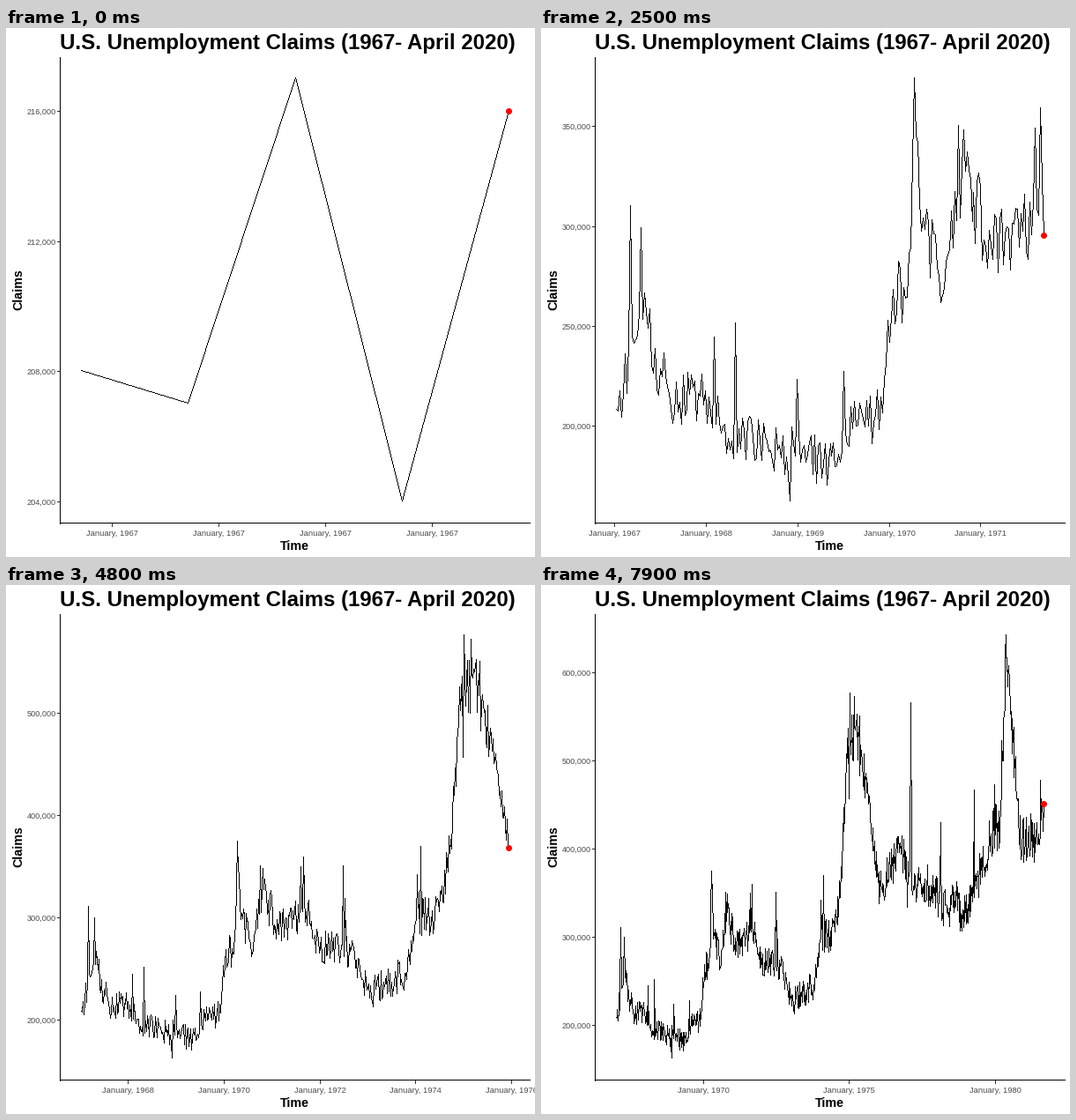
Recreate the animation shown at these times as a matplotlib script. Size 600x600 px, loop 8 s.

```python
import math

import matplotlib.pyplot as plt
import numpy as np
from matplotlib.animation import FuncAnimation

plt.rcParams["font.family"] = "Liberation Sans"

FRAMES, INTERVAL = 80, 100
WEEKS_PER_FRAME = 9.615
PX = 0.72  # points per pixel at 100 dpi
LEFT, RIGHT, TOP, BOTTOM = 85, 570, 57, 537  # data area
X0, X1, Y0, Y1 = 61, 594, 33, 561  # panel
MARGIN = 0.05
NOISE = 0.07
DAY0 = np.datetime64("1967-01-07")

# (week, thousands of claims): the slow trend, then single-week extremes
TREND = [
    (0, 208), (1, 207), (2, 217), (3, 204), (4, 216), (7, 240), (13, 256),
    (30, 216), (53, 214), (60, 196), (121, 182), (135, 198), (152, 206),
    (158, 268), (166, 264), (171, 345), (176, 298), (184, 275), (197, 330),
    (214, 290), (232, 297), (242, 318), (260, 270), (284, 272), (304, 248),
    (316, 220), (321, 229), (354, 245), (364, 295), (390, 305), (402, 362),
    (414, 520), (428, 542), (439, 500), (450, 450), (466, 368), (475, 350),
    (508, 405), (531, 357), (562, 358), (592, 325), (604, 350), (618, 320),
    (645, 362), (677, 428), (686, 425), (695, 620), (703, 575), (722, 410),
    (748, 412), (764, 451),
]
EXTREMES = [
    (8, 310), (14, 299), (56, 244), (68, 251), (99, 162), (103, 223),
    (130, 227), (170, 374), (195, 350), (239, 349), (242, 359), (285, 350),
    (287, 318), (366, 341), (370, 369), (416, 456), (417, 576), (520, 333),
    (526, 565), (579, 429), (639, 466), (675, 472), (696, 642), (758, 477),
]


def build_claims():
    week, level = np.array(TREND).T
    grid = np.arange(week[-1] + 1)
    noise = np.random.default_rng(7).uniform(-NOISE, NOISE, grid.size)
    noise[week] = 0
    claims = np.interp(grid, week, level) * (1 + noise)
    week, level = np.array(EXTREMES).T
    claims[week] = level
    return claims * 1000


def nice_breaks(lo, hi, m=5):
    """Extended Wilkinson labelling."""
    best, found = -9, (lo, hi, 2)
    span = hi - lo
    for j in (1, 2):
        for i, q in enumerate((1, 5, 2, 2.5, 4, 3)):
            simple = 1 - i / 5 - j
            for k in range(2, 11):
                z0 = math.ceil(math.log10(span / (k + 1) / j / q))
                for z in (z0, z0 + 1):
                    step = j * q * 10.0 ** z
                    first = (math.floor(hi / step) - k + 1) * j
                    last = math.ceil(lo / step) * j
                    for s in range(first, last + 1):
                        a = s * step / j
                        b = a + step * (k - 1)
                        cover = 1 - 50 * ((hi - b) ** 2 + (lo - a) ** 2) / span ** 2
                        r = (k - 1) / (b - a)
                        rt = (m - 1) / (max(b, hi) - min(a, lo))
                        dense = 2 - max(r / rt, rt / r)
                        score = 0.25 * simple + 0.2 * cover + 0.5 * dense
                        if score > best + 1e-12:
                            best, found = score, (a, b, k)
    return np.linspace(*found)


def date_grids():
    def months(n):
        return np.arange("1960-01", "1995-02", n, dtype="M8[M]").astype("M8[D]")

    weeks = np.arange("1966-12-26", "1990-01-01", 7, dtype="M8[D]")
    halves = np.sort(np.concatenate([months(1), months(1) + 14]))
    grids = [weeks, halves] + [months(n) for n in (1, 3, 6, 12, 24, 60)]
    return [(g - DAY0).astype(int) for g in grids]


def date_breaks(lo, hi, n=5):
    """Calendar step whose interval count comes closest to n."""
    def rank(grid):
        intervals = np.sum((grid > lo) & (grid < hi)) + 1
        return abs(intervals - n), abs((hi - lo) / np.mean(np.diff(grid)) - n)
    return min(GRIDS, key=rank)


def widen(lo, hi):
    pad = MARGIN * (hi - lo)
    return lo - pad, hi + pad


def pixel_path(xs, ys):
    """Every pixel on the polyline, one per step along its longer axis."""
    steps = np.maximum(abs(np.diff(xs)), abs(np.diff(ys)))
    at = np.concatenate([[0], np.cumsum(steps)])
    t = np.arange(at[-1] + 1)
    return np.rint(np.interp(t, at, xs)), np.rint(np.interp(t, at, ys))


claims = build_claims()
GRIDS = date_grids()

fig = plt.figure(figsize=(6, 6), dpi=100, facecolor="white")
ax = fig.add_axes([0, 0, 1, 1])
ax.set(xlim=(0, 600), ylim=(600, 0))
ax.axis("off")


def stroke(xs, ys, color="black", z=2):
    return ax.plot(xs, ys, color=color, lw=PX, antialiased=False, snap=True,
                   zorder=z, solid_capstyle="butt")[0]


def label(x, y, text, size, **kw):
    return ax.text(x, y, text, fontsize=size * PX, va="baseline", **kw)


def tick_labels(x, y, size, align):
    return [label(x, y, "", size, color="#4d4d4d", ha=align) for _ in range(12)]


label(61, 24, "U.S. Unemployment Claims (1967- April 2020)", 24, weight="bold")
label(327, 592, "Time", 14.3, weight="bold", ha="center")
label(18, 296.5, "Claims", 14.3, weight="bold", ha="center",
      rotation=90, rotation_mode="anchor")
stroke([X0, X0], [Y0, Y1 + 1])
stroke([X0, X1], [Y1, Y1])

ticks = stroke([], [], "#333333", 1)
series, = ax.plot([], [], ",", color="black", zorder=3)
dot, = ax.plot([], [], "o", color="red", ms=7 * PX, mew=0, zorder=4)
x_labels = tick_labels(0, 576, 9.35, "center")
y_labels = tick_labels(56.5, 0, 9.2, "right")


def draw(frame):
    last = round(4 + WEEKS_PER_FRAME * frame)
    values = claims[:last + 1]
    lo, hi, days = values.min(), values.max(), 7 * last

    def to_x(day):
        return np.rint(LEFT + (RIGHT - LEFT) * day / days)

    def to_y(v):
        return np.rint(BOTTOM - (BOTTOM - TOP) * (v - lo) / (hi - lo))

    xs, ys = to_x(7 * np.arange(last + 1)), to_y(values)
    series.set_data(*pixel_path(xs, ys))
    dot.set_data(xs[-1:], ys[-1:])

    for text in x_labels + y_labels:
        text.set_text("")
    tx, ty = [], []
    shown = [d for d in date_breaks(*widen(0, days)) if X0 <= to_x(d) <= X1]
    for text, d in zip(x_labels, shown):
        x = to_x(d)
        text.set_x(x + 0.5)
        text.set_text((DAY0 + int(d)).astype(object).strftime("%B, %Y"))
        tx += [x, x, np.nan]
        ty += [Y1, Y1 + 4, np.nan]
    shown = [v for v in nice_breaks(*widen(lo, hi)) if Y0 <= to_y(v) <= Y1]
    for text, v in zip(y_labels, shown):
        y = to_y(v)
        text.set_y(y + 4)
        text.set_text(f"{v:,.0f}")
        tx += [X0 - 3, X0, np.nan]
        ty += [y, y, np.nan]
    ticks.set_data(tx, ty)
    return [series, dot, ticks, *x_labels, *y_labels]


anim = FuncAnimation(fig, draw, frames=FRAMES, interval=INTERVAL,
                     repeat=True, repeat_delay=0)
plt.show()
```
